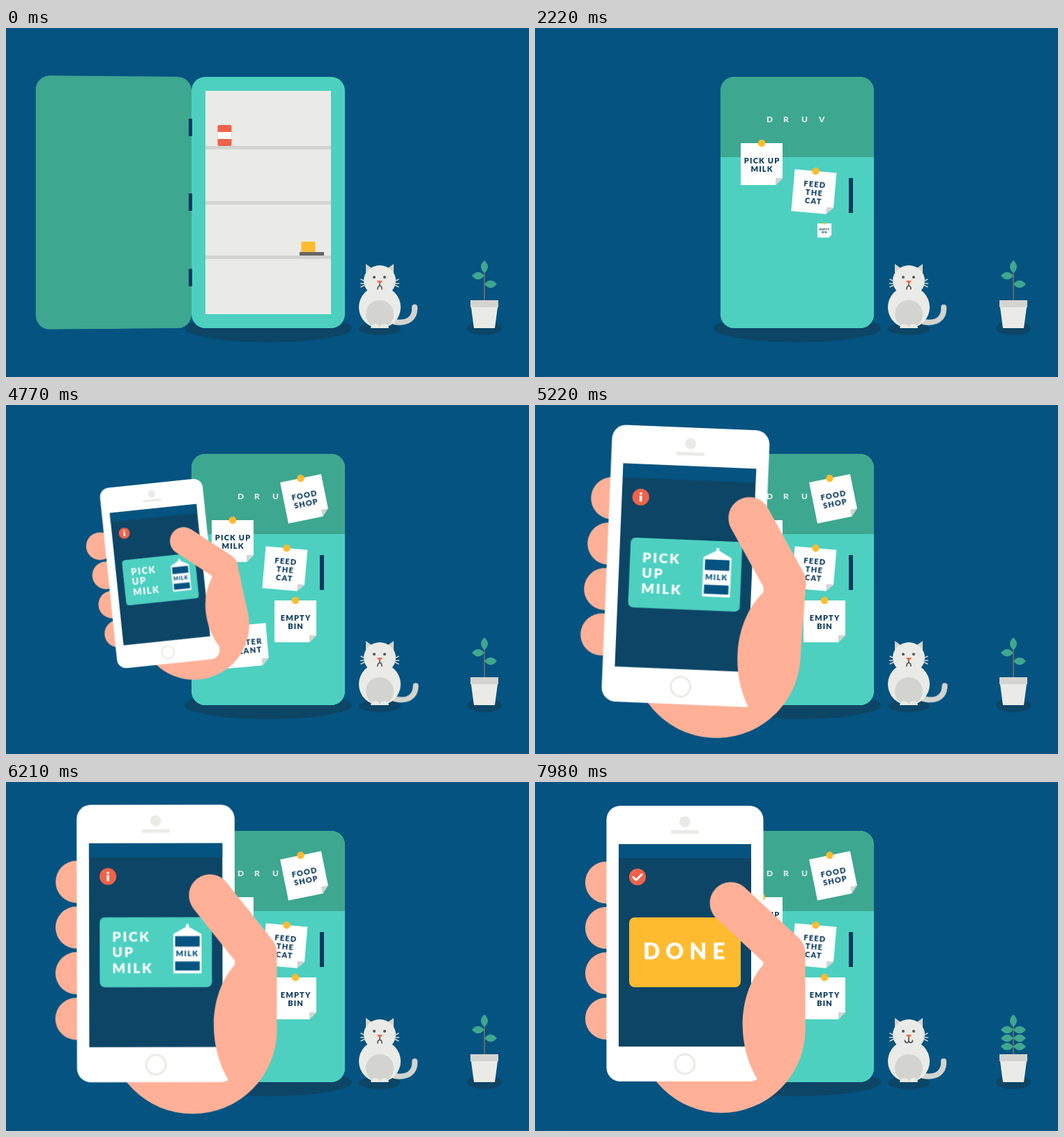
An HTML page that plays this animation: 750 by 500 pixels, repeating every 8 s.

```html
<!DOCTYPE html>
<html lang="en">
<head>
<meta charset="utf-8">
<title>Fridge reminders</title>
<style>
  html, body { margin: 0; width: 100%; height: 100%; overflow: hidden; background: #045380; }
  #stage { position: relative; width: 750px; height: 500px; overflow: hidden; background: #045380; perspective: 1050px; perspective-origin: 375px 250px; }
  svg { position: absolute; left: 0; top: 0; width: 750px; height: 500px; }
  text { font-family: Lato, "Open Sans", sans-serif; font-weight: 900; }
  #door { position: absolute; left: 266px; top: 70px; width: 220px; height: 360px; transform-origin: 0 50%; transform-style: preserve-3d; }
  .face { position: absolute; inset: 0; border-radius: 20px; backface-visibility: hidden; }
  #front { background: linear-gradient(#3ea790 115px, #4dd0c0 115px); }
  #front svg { width: 220px; height: 360px; }
  #back { background: #3ea790; transform: rotateY(180deg); }
  #back i { position: absolute; right: -1px; width: 5px; height: 25px; background: #0a3a5e; }

  .pale { fill: #eaebe6; }
  .grey { fill: #d3d4d0; }
  .shade { fill: #0c4566; }
  .teal { fill: #4dd0c0; }
  .leaf { fill: #3ea790; }
  .red { fill: #f0624a; }
  .gold { fill: #ffbb30; }
  .blue { fill: #045380; }
  .white { fill: #fff; }
  .skin { fill: #ffb097; }
  .line { fill: none; stroke-linecap: round; stroke-linejoin: round; }
  .note text { font-size: 11px; letter-spacing: 1.2px; text-anchor: middle; fill: #0a3a5e; }
  #tail { transform-origin: 558px 421px; }
  #held, .hand, #phone { transform-origin: 236px 256px; }
  #thumb { transform-origin: 357.5px 245px; }
  #info { transform-origin: 147px 136px; }
  #done { transform-origin: 215px 243px; }
</style>
</head>
<body>
<div id="stage">
  <svg viewBox="0 0 750 500">
    <ellipse class="shade" cx="376" cy="430" rx="120" ry="20"/>
    <rect class="teal" x="266" y="70" width="220" height="360" rx="20"/>
    <path class="pale" d="M286 90h180v320h-180z"/>
    <path class="grey" d="M286 169h180v5h-180zM286 248h180v5h-180zM286 326h180v5h-180z"/>
    <rect class="red" x="303.500" y="139" width="20" height="30" rx="2"/>
    <path class="white" d="M303.500 149h20v10h-20z"/>
    <rect class="gold" x="423.500" y="306" width="20" height="16" rx="1.500"/>
    <path fill="#666" d="M421 321h35v5h-35z"/>

    <ellipse class="shade" cx="536" cy="431" rx="30" ry="9"/>
    <path id="tail" class="line" stroke="#d3d4d0" stroke-width="8" d="M557 421C576 424 587 416 586 400"/>
    <circle class="pale" cx="536" cy="400" r="30"/>
    <circle class="grey" cx="536" cy="410" r="20"/>
    <path class="pale" d="M523 430a6.500 6 0 0 1 13 0a6.500 6 0 0 1 13 0z"/>
    <path class="grey" d="M516 338v20l14-10zM556 338v20l-14-10z"/>
    <ellipse class="pale" cx="536" cy="362" rx="23" ry="22"/>
    <path class="line" stroke="#d3d4d0" stroke-width="1.500" d="M509 360l5 2.500M508.500 366h6M509 371l5-2.500M563 360l-5 2.500M563.500 366h-6M563 371l-5-2.500"/>
    <circle fill="#555" cx="528" cy="357" r="2"/>
    <circle fill="#555" cx="543" cy="357" r="2"/>
    <g class="line" stroke="#555" stroke-width="1.700">
      <path id="frown" d="M536 365v4M533 374q0-4.500 3-4.500t3 4.500"/>
      <path id="smile" d="M536 365v4M530.500 370q0 3.500 2.750 3.500t2.750-3.500q0 3.500 2.750 3.500t2.750-3.500"/>
    </g>
    <path class="red" d="M532 362h8l-4 5z"/>

    <ellipse class="shade" cx="686" cy="430" rx="25" ry="10"/>
    <path d="M686 346v46" stroke="#666" stroke-width="2"/>
    <path class="leaf" d="M686 333q10 9 0 18q-10-9 0-18"/>
    <g id="leaves"></g>
    <path class="pale" d="M667 400h38l-4 30h-30z"/>
    <path class="grey" d="M666 390h40v10h-40z"/>
  </svg>

  <div id="door">
    <div id="front" class="face">
      <svg viewBox="0 0 220 360">
        <text x="66 90 116 141" y="65" font-size="12" fill="#d9ece4">DRUV</text>
        <path fill="#0a3a5e" d="M184 145h6v50h-6z"/>
      </svg>
    </div>
    <div id="back" class="face"><i style="top:60px"></i><i style="top:167px"></i><i style="top:275px"></i></div>
  </div>

  <svg viewBox="0 0 750 500">
    <g id="burst" class="line" stroke="#1f86c8" stroke-width="3"></g>
    <g id="notes"></g>
    <g id="held">
      <g class="hand skin">
        <circle cx="267.500" cy="354" r="120"/>
        <circle cx="102" cy="144" r="30"/>
        <circle cx="102" cy="209" r="30"/>
        <circle cx="102" cy="274" r="30"/>
        <circle cx="102" cy="339" r="30"/>
      </g>
      <g id="phone">
        <rect class="white" x="102.500" y="34" width="225" height="395" rx="20"/>
        <circle class="pale" cx="215" cy="57" r="8"/>
        <rect class="pale" x="195" y="69" width="40" height="5" rx="1"/>
        <path class="shade" d="M120 89h190v290h-190z"/>
        <path class="blue" d="M120 89h190v20h-190z"/>
        <circle class="line" cx="215" cy="404" r="14" stroke="#eaebe6" stroke-width="3"/>
        <circle class="red" cx="147" cy="136" r="12"/>
        <path id="info" class="white" d="M145.300 134h3.400v8.500h-3.400zM145.300 129.500h3.400v3h-3.400z"/>
        <path id="check" class="line" stroke="#fff" stroke-width="3" pathLength="1" stroke-dasharray="1 2" d="M141 136.500l4 4l8-8"/>
        <clipPath id="card"><rect x="135" y="194" width="160" height="100" rx="8"/></clipPath>
        <g clip-path="url(#card)">
          <path class="teal" d="M135 194h160v100h-160z"/>
          <g class="white" font-size="19.500" letter-spacing="2.400">
            <text x="153" y="229">PICK</text>
            <text x="153" y="251">UP</text>
            <text x="153" y="273">MILK</text>
          </g>
          <path class="white" d="M240 274v-56l18-10v-4h4v4l18 10v56z"/>
          <path class="blue" d="M242.500 221h35v15h-35zM242.500 257h35v13h-35z"/>
          <text class="blue" x="243.500" y="250" font-size="11" letter-spacing="1.200">MILK</text>
          <path id="wipe" class="gold" d="M-70 194h205l-29 100h-176z"/>
          <text id="done" class="white" x="155" y="254" font-size="32" letter-spacing="8">DONE</text>
        </g>
      </g>
      <g class="hand skin">
        <path d="M387.500 245V354A120 120 0 0 1 319.500 462L320 428C289 378 289 305 328 261z"/>
        <path id="thumb" class="line" stroke="#ffb097" stroke-width="60" d="M357.500 245h-105"/>
      </g>
    </g>
  </svg>
</div>

<script>
const LOOP = 8000;
const $ = id => document.getElementById(id);

// keys: [ms, value, easing to the next key]
function play(el, prop, keys, wrap = v => v) {
  const first = keys[0], last = keys[keys.length - 1];
  const all = [[0, first[1]], ...keys.filter(k => k[0] > 0 && k[0] < LOOP), [LOOP, last[1]]];
  el.animate(
    all.map(([ms, v, easing = 'linear']) => ({ offset: ms / LOOP, [prop]: wrap(v), easing })),
    { duration: LOOP, iterations: Infinity });
}
const spin = (el, keys) => play(el, 'transform', keys, v => `rotate(${v}deg)`);
const grow = (el, keys) => play(el, 'transform', keys, v => `scale(${v})`);

function add(parent, markup) {
  parent.insertAdjacentHTML('beforeend', markup);
  return parent.lastElementChild;
}

// Door and the burst as it shuts
play($('door'), 'transform',
  [[30, -177, 'cubic-bezier(.5,0,.8,.65)'], [840, 0]], v => `rotateY(${v}deg)`);

for (const angle of [-90, -44, -2, 42]) {
  const spoke = add($('burst'), `<g transform="translate(475 82) rotate(${angle})"><path d="M0 0h15"/></g>`).firstElementChild;
  play(spoke, 'transform', [[840, [20, 0]], [960, [35, 1]], [1200, [80, 0]]],
    ([r, s]) => `translateX(${r}px) scaleX(${s})`);
  play(spoke, 'opacity', [[839, 0], [840, 1], [1199, 1], [1200, 0]]);
}

// Notes: pin x, pin y, tilt, start, lines
const notes = [
  [325, 165, 0, 1640, ['PICK UP', 'MILK']],
  [402.5, 205, 5, 1900, ['FEED', 'THE', 'CAT']],
  [415, 280, 0, 2150, ['EMPTY', 'BIN']],
  [422.5, 105, -11.5, 2400, ['FOOD', 'SHOP']],
  [342.5, 315, -5, 2660, ['WATER', 'PLANT']],
];
for (const [x, y, tilt, start, lines] of notes) {
  const top = 41 - lines.length * 6;
  const text = lines.map((s, i) => `<text x=".6" y="${top + i * 12}">${s}</text>`).join('');
  const note = add($('notes'), `<g class="note" transform="translate(${x} ${y}) rotate(${tilt})"><g>
    <path class="white" d="M-30 0h60v50l-10 10h-50z"/><path class="grey" d="M20 50h10l-10 10z"/>
    ${text}<circle class="gold" r="5.200"/></g></g>`).firstElementChild;
  grow(note, [[start, 0, 'ease-out'], [start + 320, 1]]);
}

// Phone springs in, the hand leading it
grow($('held'), [[4440, 0, 'ease-in'], [4770, .655], [4860, .865, 'ease-out'], [5010, 1.05, 'ease-in-out'],
  [5400, .97, 'ease-in-out'], [5730, .988, 'ease-in-out'], [5940, 1.025, 'ease-in-out'], [6360, 1]]);
for (const hand of document.querySelectorAll('.hand'))
  spin(hand, [[4440, -30], [4770, -12], [4860, -5, 'ease-out'], [5040, 13, 'ease-in-out'],
    [5400, -4, 'ease-in-out'], [5730, .9, 'ease-in-out'], [6360, 0]]);
spin($('phone'), [[4440, -12], [4770, -6], [4860, -3, 'ease-out'], [5070, 4, 'ease-in-out'],
  [5490, -2, 'ease-in-out'], [5730, -.8, 'ease-in-out'], [6360, 0]]);
spin($('thumb'), [[4770, 45, 'ease-in-out'], [5400, 59], [5800, 59, 'ease-in-out'], [6700, 41, 'ease-in'],
  [6870, 48.2], [7110, 64, 'ease-in-out'], [7330, 53, 'ease-out'], [7800, 43]]);

// Swipe to done
play($('wipe'), 'transform', [[6840, 0], [6870, 8], [7170, 195]], v => `translateX(${v}px)`);
spin($('info'), [[6780, 0, 'ease-in'], [6870, 20], [7110, 180]]);
play($('info'), 'opacity', [[6930, 1], [7110, 0]]);
play($('check'), 'strokeDashoffset', [[7320, 1, 'ease-out'], [7560, 0]]);
play($('check'), 'opacity', [[7319, 0], [7320, 1]]);
grow($('done'), [[7230, 0, 'ease-out'], [7530, 1]]);

// Plant and cat
for (const y of [355, 367, 379]) for (const side of [-1, 1]) {
  const leaf = add($('leaves'), `<g transform="translate(686 ${y}) scale(${side} 1)"><path class="leaf" d="M0 0q9-10.500 18 0q-9 10.500-18 0"/></g>`).firstElementChild;
  const early = (y === 355 && side < 0) || (y === 367 && side > 0);
  if (!early) grow(leaf, [[7260, 0, 'ease-out'], [7650, 1]]);
}
play($('frown'), 'opacity', [[7319, 1], [7320, 0]]);
play($('smile'), 'opacity', [[7319, 0], [7320, 1]]);
$('tail').animate({ transform: ['rotate(0deg)', 'rotate(5deg)'] },
  { duration: 1000, iterations: Infinity, direction: 'alternate', easing: 'ease-in-out' });
</script>
</body>
</html>
```
